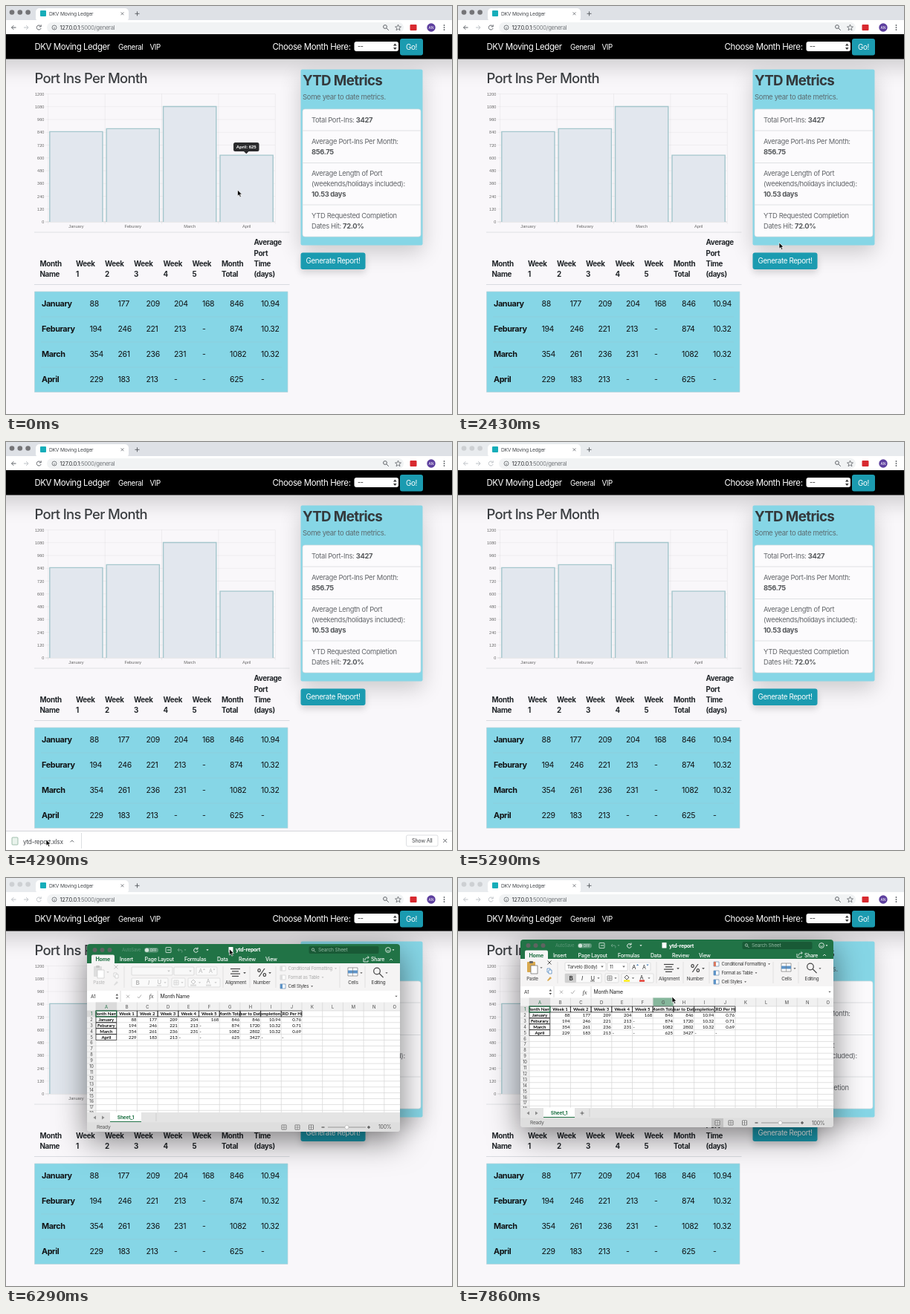
Animation, 600 px wide and 550 px high, one loop 8000 ms. Source, as an HTML page with a canvas:

```html
<!DOCTYPE html>
<html lang="en">
<head>
<meta charset="utf-8">
<title>Monthly report</title>
<style>
html, body { margin: 0; width: 100%; height: 100%; overflow: hidden; }
canvas { display: block; }
</style>
</head>
<body>
<canvas id="stage" width="600" height="550"></canvas>
<script>
const ctx = document.getElementById('stage').getContext('2d');
const LOOP = 8000, CYAN = '#86d6e6', TEAL = '#1b9bb0', GREEN = '#217346';
const BRAND = 'DKV Moving Ledger';
const SANS = 'Inter, sans-serif', ARIAL = '"Liberation Sans", sans-serif', LATO = 'Lato, sans-serif';
const TRACKING = -0.035; // em, the tight setting of the interface face
const months = ['January', 'Feburary', 'March', 'April'];
const weeks = [[88, 177, 209, 204, 168], [194, 246, 221, 213, '-'], [354, 261, 236, 231, '-'], [229, 183, 213, '-', '-']];
const totals = [846, 874, 1082, 625];
const portDays = ['10.94', '10.32', '10.32', '-'];
const hitRate = ['0.76', '0.71', '0.69', '-'];

// [time, x, y]; the pointer and the spreadsheet window
const pointerPath = [[0, 311.5, 248], [1000, 311.5, 248], [1710, 374, 280], [2000, 374, 280], [2430, 432, 319],
  [2680, 440, 342], [3000, 440, 342], [3570, 195, 473], [3900, 54, 536], [4700, 54, 536]];
const windowPath = [[6000, 124, 93], [6290, 109, 89], [6570, 84, 83]];
const afterDrag = [[7000, 275, 89.5], [7140, 275, 89.5], [7720, 288, 160]];

function along(path, t) {
  const i = path.findIndex(p => p[0] > t);
  if (i < 0) return path.at(-1).slice(1);
  if (i === 0) return path[0].slice(1);
  const [a, b] = [path[i - 1], path[i]];
  const k = (t - a[0]) / (b[0] - a[0]), e = k * k * (3 - 2 * k);
  return [1, 2].map(n => a[n] + (b[n] - a[n]) * e);
}

function text(s, x, y, size, color = '#212529', { weight = 400, align = 'left', font = SANS } = {}) {
  ctx.font = `${weight} ${size}px ${font}`;
  ctx.letterSpacing = (font === SANS ? TRACKING * size : 0) + 'px';
  ctx.textAlign = align;
  ctx.fillStyle = color;
  ctx.fillText(s, x, y);
}
function box(x, y, w, h, fill, radius = 0, stroke) {
  ctx.beginPath();
  ctx.roundRect(x, y, w, h, radius);
  if (fill) { ctx.fillStyle = fill; ctx.fill(); }
  if (stroke) { ctx.strokeStyle = stroke; ctx.lineWidth = 0.7; ctx.stroke(); }
}
function dot(x, y, r, fill, stroke, width = 1) {
  ctx.beginPath();
  ctx.arc(x, y, r, 0, 7);
  if (fill) { ctx.fillStyle = fill; ctx.fill(); }
  if (stroke) { ctx.strokeStyle = stroke; ctx.lineWidth = width; ctx.stroke(); }
}
function line(points, color, width = 1) {
  ctx.beginPath();
  for (let i = 0; i < points.length; i += 2) ctx.lineTo(points[i], points[i + 1]);
  ctx.strokeStyle = color;
  ctx.lineWidth = width;
  ctx.stroke();
}
function shape(d, fill, stroke, width = 1) {
  const p = new Path2D(d);
  if (fill) { ctx.fillStyle = fill; ctx.fill(p); }
  if (stroke) { ctx.strokeStyle = stroke; ctx.lineWidth = width; ctx.stroke(p); }
}
function at(x, y, draw) {
  ctx.save();
  ctx.translate(x, y);
  draw();
  ctx.restore();
}
function shadowed(color, blur, dy, draw) {
  ctx.save();
  Object.assign(ctx, { shadowColor: color, shadowBlur: blur, shadowOffsetY: dy });
  draw();
  ctx.restore();
}
const largeShadow = draw => shadowed('rgba(0,0,0,.19)', 29, 9.6, draw);
const cross = (x, y, r, color, w = 1) => {
  line([x - r, y - r, x + r, y + r], color, w);
  line([x - r, y + r, x + r, y - r], color, w);
};
const plus = (x, y, r, color, w = 1) => {
  line([x - r, y, x + r, y], color, w);
  line([x, y - r, x, y + r], color, w);
};
const caret = (x, y, color, s = 1) => shape(`M${x - 2 * s} ${y - s}h${4 * s}l${-2 * s} ${2.4 * s}z`, color);
const magnifier = (x, y, r, color, w = 1) => {
  dot(x, y, r, null, color, w);
  line([x + r * 0.7, y + r * 0.7, x + r * 2, y + r * 2], color, w);
};

function browserBar(active) {
  box(0, 0, 600, 19, active ? '#dee1e6' : '#e8ebee');
  for (const x of [8, 18.8, 29.6]) dot(x, 8.5, 3.3, active ? '#747477' : '#cdd0d3');
  box(40, 3, 125, 18, '#fff', 5);
  box(46, 6, 8, 8, '#16adb9', 1);
  text(BRAND, 58, 12.6, 6.7, '#45494d');
  cross(156.5, 10.3, 1.9, '#5f6368', 0.8);
  plus(176.5, 10.3, 3, '#5f6368', 1);
  box(0, 19, 600, 19, '#fff');
  const nav = active ? '#5f6368' : '#bdc1c6';
  line([13.5, 29, 7.5, 29], nav);
  line([10.3, 26.2, 7.5, 29, 10.3, 31.8], nav);
  line([24, 29, 30, 29], '#bdc1c6');
  line([27.2, 26.2, 30, 29, 27.2, 31.8], '#bdc1c6');
  shape('M46.5 27a3 3 0 1 0 .6 3M47.2 25.3v2.6h-2.6', null, nav);
  box(55, 22, 480, 14, '#f1f3f4', 7);
  dot(65, 29, 3, null, '#5f6368', 0.8);
  line([65, 28.5, 65, 31], '#5f6368', 0.8);
  text('127.0.0.1', 72.5, 31.7, 7.6, '#303236');
  text(':5000/general', 72.5 + ctx.measureText('127.0.0.1').width, 31.7, 7.6, '#74787c');
  magnifier(510, 28, 2.4, '#5f6368');
  shape('M527.5 25l1.1 2.8 2.9.2-2.3 1.8.8 2.9-2.5-1.6-2.5 1.6.8-2.9-2.3-1.8 2.9-.2z', null, '#5f6368', 0.8);
  box(543.5, 25, 9, 8, '#d8292f', 1);
  dot(572, 29, 5.7, '#5d3f9e');
  text('AN', 572, 31, 5, '#fff', { align: 'center' });
  for (const y of [26, 29, 32]) dot(589.5, y, 0.9, '#5f6368');
}

function button(label, x, y, w, h, baseline, size, fill = TEAL) {
  shadowed('rgba(0,0,0,.15)', 9.6, 4.8, () => box(x, y, w, h, fill, 3));
  text(label, x + w / 2, baseline, size, '#fff', { align: 'center' });
}

function navBar() {
  largeShadow(() => box(-30, 38, 660, 33.5, '#000'));
  text(BRAND, 38.5, 59.3, 11.4, '#fff');
  text('General', 151, 58.8, 9.7, '#fff');
  text('VIP', 193.5, 58.8, 9.7, '#fff');
  text('Choose Month Here:', 358.5, 59.3, 11.5, '#fff');
  box(468.5, 48, 59.5, 13, '#fff', 3);
  text('--', 473, 57.3, 9, '#222');
  shape('M521 53.5l2.3-3 2.3 3zM521 56l2.3 3 2.3-3z', '#333');
  box(530, 44, 31, 22.5, TEAL, 3);
  text('Go!', 545.5, 58.7, 9.8, '#fff', { align: 'center' });
}

function chart(showTip) {
  text('Port Ins Per Month', 38.5, 103.5, 18.4, '#3a3d40', { weight: 500 });
  const yOf = v => 291 - v * 172.5 / 1200;
  for (let v = 0; v <= 1200; v += 120) {
    text(v, 51.3, yOf(v) + 2, 5.5, '#666', { align: 'right', font: ARIAL });
    line([53, yOf(v), 362, yOf(v)], v ? 'rgba(0,0,0,.06)' : 'rgba(0,0,0,.18)', 0.7);
  }
  for (let i = 0; i < 5; i++) line([56.7 + i * 76.4, 118.5, 56.7 + i * 76.4, 294], 'rgba(0,0,0,.07)', 0.7);
  months.forEach((name, i) => {
    const x = 58.8 + i * 76.4, y = yOf(totals[i]);
    ctx.fillStyle = '#e2e7ee';
    ctx.fillRect(x, y, 71.2, 291 - y);
    line([x, 291, x, y, x + 71.2, y, x + 71.2, 291], '#a4c6cc', 1.4);
    text(name, x + 35.6, 299, 5.7, '#666', { align: 'center', font: ARIAL });
  });
  if (showTip) {
    box(306, 184, 34.5, 12, '#2b2b2d', 2.5);
    shape('M320 196h6.5l-3.25 3.2z', '#2b2b2d');
    text('April: 625', 323.2, 192.2, 5.9, '#fff', { align: 'center', font: ARIAL, weight: 700 });
  }
}

function monthTable() {
  line([38, 305, 381.5, 305], '#dee0e4');
  line([38, 375.5, 381.5, 375.5], '#d8dbe0');
  const heads = ['Month Name', 'Week 1', 'Week 2', 'Week 3', 'Week 4', 'Week 5', 'Month Total', 'Average Port Time (days)'];
  const headX = [45.5, 94, 133, 172, 211.5, 250.5, 290, 333.5];
  heads.forEach((head, i) => {
    const words = head.split(' ');
    words.forEach((word, n) => text(word, headX[i], 365 - 14.2 * (words.length - 1 - n), 9.8, '#212529', { weight: 700 }));
  });
  box(38.5, 385, 340.5, 135.5, CYAN, 0, '#b9d3da');
  const cellX = [112.5, 150.5, 188.5, 226, 264, 301, 343];
  months.forEach((name, r) => {
    const y = 405.3 + r * 34;
    if (r) line([47, y - 20.3, 371, y - 20.3], 'rgba(150,195,205,.55)', 0.8);
    text(name, 48, y, 10.8, '#101214', { weight: 700 });
    [...weeks[r], totals[r], portDays[r]].forEach((v, i) => text(v, cellX[i], y, 10.5, '#101214'));
  });
}

function metricsCard(hover) {
  largeShadow(() => box(396.5, 85.5, 164, 237, CYAN, 2));
  text('YTD Metrics', 399, 107, 18.8, '#34393c', { weight: 700 });
  text('Some year to date metrics.', 399, 126, 9.5, '#5c6b70');
  box(399, 139, 159, 172, '#fcfbfd', 3, '#d5d9dd');
  for (const y of [168, 211.5, 268]) line([399, y, 558, y], '#dfe1e4');
  const rows = [['Total Port-Ins: ', 157.3, '3427'], ['Average Port-Ins Per Month:', 186.3], ['', 200.3, '856.75'],
    ['Average Length of Port', 229], ['(weekends/holidays included):', 243], ['', 257.2, '10.53 days'],
    ['YTD Requested Completion', 285.5], ['Dates Hit: ', 299.5, '72.0%']];
  for (const [label, y, value] of rows) {
    text(label, 411, y, 9.4, '#63666a');
    if (value) text(value, 411 + ctx.measureText(label).width, y, 9.4, '#55585b', { weight: 700 });
  }
  button('Generate Report!', 396.5, 332.5, 87, 22.5, 347.3, 9.75, hover ? '#138496' : TEAL);
}

function downloadShelf(t) {
  const open = t > 3140 && t < 4570;
  if (open) {
    box(0, 525, 600, 25, '#fff');
    line([0, 524.5, 600, 524.5], '#d5d7da');
    box(8, 533, 8, 10, '#e9f3ec', 1, '#7fa890');
    text('ytd-report.xlsx', 23, 541.5, 8.3, '#44474b');
    line([86.5, 539.3, 88.8, 537, 91.1, 539.3], '#5f6368');
    line([101.5, 527, 101.5, 548], '#dcdee1');
    box(538.5, 530, 42.5, 15, '#fff', 2, '#cfd2d6');
    text('Show All', 559.7, 540.2, 7.2, '#44474b', { align: 'center' });
    cross(590.7, 537.5, 2.4, '#5f6368');
  }
  if (t > 2640 && t < 3750) {
    const y = open ? 514 : 539;
    box(-1, y, 199, 11, '#fff', [0, 2, 0, 0], '#b9bcc0');
    text('127.0.0.1:5000/ytd-report', 0.5, y + 8, 7.3, '#85898d');
  }
  const k = (t - 3200) / 700;
  if (k > 0 && k < 1) {
    ctx.globalAlpha = Math.sin(k * Math.PI);
    dot(18, 525, 17, 'rgba(225,228,232,.55)', 'rgba(190,195,200,.7)');
    shape('M16.2 518h3.6v5h3.2l-5 5.5-5-5.5h3.2z', '#4a90d9');
    ctx.globalAlpha = 1;
  }
}

function ribbon(on) {
  const ink = on ? '#333' : '#b5b5b5', soft = on ? '#666' : '#c6c6c6';
  const label = (s, x) => text(s, x, 54.5, 6.3, '#333', { align: 'center' });
  box(0, 26, 421, 37, '#f5f4f4');
  for (const x of [50, 183, 219, 254, 340, 374]) line([x, 30, x, 59], '#dcdcdc', 0.8);
  // Clipboard
  box(9, 30, 11, 14, on ? '#d9a94f' : '#ddd', 1);
  box(12, 29, 5, 3, soft, 1);
  box(14, 35, 9, 11, '#fff', 0, soft);
  text('Paste', 16, 54.5, 6.3, ink, { align: 'center' });
  caret(28, 38, soft, 0.8);
  cross(39, 31, 2.5, ink, 0.8);
  box(36, 39, 4, 5, '#fff', 0, on ? '#3d7ab8' : soft);
  box(38, 41, 4, 5, '#fff', 0, on ? '#3d7ab8' : soft);
  shape('M36 55l4-5 2 2-5 4z', on ? '#d9a94f' : '#ddd');
  // Font
  box(60, 31, 55, 11, on ? '#fff' : '#f8f8f8', 1, '#cfcfcf');
  box(117, 31, 27, 11, on ? '#fff' : '#f8f8f8', 1, '#cfcfcf');
  if (on) {
    text('Tarvelo (Body)', 63, 39, 6.3, '#333');
    text('11', 120, 39, 6.3, '#333');
  }
  caret(110, 36.5, soft, 0.9);
  caret(139, 36.5, soft, 0.9);
  box(147, 31, 28, 11, '#fafafa', 1, '#d5d5d5');
  text('A', 150, 39.5, 8, ink);
  text('A', 164, 39.5, 7, ink);
  shape('M156 35l1.5-2 1.5 2zM169.5 33.5h3l-1.5 2z', on ? '#3d7ab8' : soft);
  box(60, 46, 49, 12, '#fafafa', 1, '#d5d5d5');
  if (on) box(60, 46, 15, 12, '#cfcfcf', 1);
  text('B', 65.5, 55, 8, ink, { weight: 700 });
  text('I', 82, 55, 8, ink, { weight: 'italic 400' });
  text('U', 94.5, 54.5, 7.5, ink);
  line([94, 56, 100, 56], ink, 0.7);
  caret(105, 52, soft, 0.8);
  box(114, 46, 18, 12, '#fafafa', 1, '#d5d5d5');
  box(117, 49, 6, 6, null, 0, soft);
  plus(120, 52, 3, soft, 0.6);
  caret(128, 52, soft, 0.8);
  box(136, 46, 43, 12, '#fafafa', 1, '#d5d5d5');
  shape('M140 51l3-3 3 3-3 3z', null, ink, 0.8);
  box(139, 54.5, 8, 2.2, on ? '#ffeb00' : '#ddd');
  caret(151.5, 52, soft, 0.8);
  text('A', 160.5, 53.5, 7.5, ink);
  box(160, 54.5, 7, 2.2, on ? '#e02b20' : '#ddd');
  caret(173, 52, soft, 0.8);
  // Alignment, number, styles, cells, editing
  [0, 1, 2, 3].forEach(i => line([193 + i % 2 * 2, 33.5 + i * 3.3, 206 - i % 2 * 2, 33.5 + i * 3.3], '#444', 1.2));
  caret(212, 39, '#555', 0.9);
  label('Alignment', 200);
  text('%', 235, 44, 15, '#444', { align: 'center', weight: 500 });
  caret(246, 39, '#555', 0.9);
  label('Number', 235);
  ['Conditional Formatting', 'Format as Table', 'Cell Styles'].forEach((s, i) => {
    const y = 33 + i * 12, live = on || i === 2;
    box(260, y - 3, 7, 6, '#fff', 0, live ? '#6488ac' : '#ccc');
    box(260, y - 3, 3, 6, live ? ['#d9785f', '#5d93c7', '#5d93c7'][i] : '#ddd');
    text(s, 270.5, y + 2.2, 6, live ? '#333' : '#aaa');
    caret(275 + ctx.measureText(s).width, y, live ? '#555' : '#bbb', 0.7);
  });
  box(351, 32, 13, 11, '#fff', 0, '#777');
  box(351, 35.5, 13, 4, '#5d93c7');
  line([357.5, 32, 357.5, 43], '#777', 0.6);
  caret(369, 39, '#555', 0.8);
  label('Cells', 358);
  magnifier(390, 36.5, 4.3, '#444', 1.2);
  caret(403, 39, '#555', 0.8);
  label('Editing', 392);
}

function sheet(hoverG) {
  const colX = i => 12 + i * 27.7, rowY = i => 90 + i * 7.9;
  box(0, 63, 421, 177, '#fff');
  text('A1', 5, 73, 6.6, '#333');
  shape('M38.5 69.5l1.8-2.5 1.8 2.5zM38.5 72l1.8 2.5 1.8-2.5z', '#555');
  line([45, 63, 45, 78], '#d0d0d0', 0.8);
  cross(55, 70.7, 2, '#b0b0b0');
  line([68, 71, 69.7, 73, 73, 68.5], '#b0b0b0');
  text('fx', 83.5, 73.5, 8.5, '#444', { weight: 'italic 400', font: '"Liberation Serif", serif' });
  line([95, 63, 95, 78], '#d0d0d0', 0.8);
  text('Month Name', 98.5, 73.2, 6.9, '#222');
  caret(416, 70.5, '#555', 0.8);
  box(0, 78.5, 421, 11.5, '#f1f1f1');
  box(0, 90, 12, 137, '#f1f1f1');
  box(colX(0), 78.5, 27.7, 11.5, '#dadada');
  box(0, 90, 12, 7.9, '#dadada');
  if (hoverG) box(colX(6), 78.5, 27.7, 11.5, '#86b79c');
  ctx.save();
  ctx.beginPath();
  ctx.rect(0, 78.5, 421, 148.5);
  ctx.clip();
  for (let i = 0; i < 15; i++) {
    line([colX(i), 78.5, colX(i), 227], '#d4d4d4', 0.7);
    text(String.fromCharCode(65 + i), colX(i) + 13.9, 86.7, 5.8, i ? '#444' : GREEN, { align: 'center' });
  }
  for (let i = 0; i < 18; i++) {
    line([0, rowY(i), 421, rowY(i)], '#d4d4d4', 0.7);
    text(i + 1, 6, rowY(i) + 6, 5.7, i ? '#444' : GREEN, { align: 'center' });
  }
  const cell = (s, c, r, bold) => {
    ctx.save();
    ctx.beginPath();
    ctx.rect(colX(c), rowY(r), 27.7, 7.9);
    ctx.clip();
    const align = bold ? 'center' : s === '-' ? 'left' : 'right';
    const x = colX(c) + { center: 13.85, left: 1, right: 26.7 }[align];
    text(s, x, rowY(r) + 6, 6, '#000', { align, weight: bold ? 700 : 400, font: LATO });
    ctx.restore();
    if (bold) box(colX(c), rowY(r), 27.7, 7.9, null, 0, '#222');
  };
  ['Month Name', 'Week 1', 'Week 2', 'Week 3', 'Week 4', 'Week 5', 'Month Total', 'Year to Date', 'Completion D', 'CRD Per Hit']
    .forEach((s, i) => cell(s, i, 0, true));
  let yearToDate = 0;
  months.forEach((name, r) => {
    yearToDate += totals[r];
    cell(name, 0, r + 1, true);
    [...weeks[r], totals[r], yearToDate, portDays[r], hitRate[r]].forEach((v, i) => cell(v, i + 1, r + 1));
  });
  ctx.strokeStyle = GREEN;
  ctx.lineWidth = 1.2;
  ctx.strokeRect(colX(0), rowY(0), 27.7, 7.9);
  ctx.restore();
}

function spreadsheet(t) {
  const on = t >= 7070;
  shadowed('rgba(0,0,0,.5)', 42, 12, () => box(0, 0, 421, 253, '#e6e6e6', 4));
  box(0, 0, 421, 27, GREEN, [4, 4, 0, 0]);
  for (const x of [10.5, 20.5, 30.5]) dot(x, 8, 3, '#5f6461');
  text('AutoSave', 47, 10.2, 6, '#5b9577');
  box(77, 5, 19, 6.5, '#5b9577', 3.2);
  dot(80.5, 8.2, 2.6, '#d5e5dc');
  text('OFF', 84.5, 10.2, 5, '#e4efe8');
  box(106, 4.5, 7, 7, null, 0.5, '#fff');
  line([108, 8, 112, 8], '#fff', 0.8);
  shape('M122 8h5a2 2 0 0 1 0 3.5M124 6l-2 2 2 2', null, '#6fa488', 0.9);
  caret(132, 8, '#6fa488', 0.7);
  shape('M148.5 6.5a2.8 2.8 0 1 0 .7 2.5M149 4.5v2.5h-2.5', null, '#fff', 0.9);
  caret(162, 8, '#fff', 0.8);
  box(190.5, 4, 6, 7.5, '#fff', 0.5);
  text('ytd-report', 200, 10.5, 7, '#fff', { weight: 700 });
  box(298.5, 3, 94, 10, '#195a36', 2);
  magnifier(304, 7.5, 1.7, '#b5d0c0', 0.8);
  text('Search Sheet', 311, 10.4, 6.7, '#8fb7a0');
  dot(405, 8, 3.4, null, '#fff', 0.8);
  shape('M403.2 8.5q1.8 2 3.6 0', null, '#fff', 0.7);
  caret(412, 8, '#fff', 0.7);
  box(6, 14.5, 31, 13, '#f5f4f4', [2, 2, 0, 0]);
  [['Home', 11.5], ['Insert', 44], ['Page Layout', 77.5], ['Formulas', 131], ['Data', 175], ['Review', 204], ['View', 240]]
    .forEach(([s, x], i) => text(s, x, 23.5, 7.1, i ? '#fff' : GREEN, { weight: i ? 500 : 700 }));
  shape('M372 19v5h6v-2M374 22q0-4 5-4m-1.5-1.7l1.8 1.7-1.8 1.7', null, '#fff', 0.8);
  text('Share', 382, 23.5, 7, '#fff', { weight: 500 });
  line([407, 22, 409, 20, 411, 22], '#fff', 0.8);
  ribbon(on);
  sheet(t >= 7640);
  // Sheet tabs and status bar
  box(0, 227, 421, 13.5, '#e4e4e4');
  shape('M12 231.5v5l-3.5-2.5zM20 231.5v5l3.5-2.5z', '#8b8b8b');
  box(31, 226.5, 42, 13.5, '#fff');
  line([31, 239.5, 73, 239.5], GREEN);
  text('Sheet_1', 52, 235.7, 6.6, GREEN, { align: 'center', weight: 700 });
  line([93, 228, 93, 239], '#c6c6c6', 0.7);
  if (on) plus(83, 234, 2.5, '#555', 0.9);
  box(0, 240.5, 421, 12.5, '#dedede', [0, 0, 4, 4]);
  text('Ready', 13, 249.4, 6.6, '#555');
  if (on) box(257, 241, 16, 12, '#c2c2c2');
  for (const x of [265, 283, 301.5]) {
    box(x - 3, 244, 6, 6, '#f4f4f4', 0, '#555');
    plus(x, 247, 3, '#555', 0.6);
  }
  line([315.5, 247, 319.5, 247], '#444', 1.1);
  line([324, 247, 375, 247], '#9a9a9a', 1.2);
  dot(349.5, 247, 2.6, '#fff', '#aaa', 0.6);
  plus(379, 247, 2, '#444', 1.1);
  text('100%', 392, 249.5, 6.9, '#555');
}

function pointer(x, y, kind) {
  at(x, y, () => {
    if (kind === 'beam') return shape('M-1.5-4.5q1.5 0 1.5 1.5v7q0 1.5-1.5 1.5M1.5-4.5q-1.5 0-1.5 1.5v7q0 1.5 1.5 1.5M-1 1.5h2', null, '#222', 0.9);
    if (kind === 'hand') return shape('M-1 0q1-1.5 2 0v3.5l4 .8q1 .4.8 2l-.8 3.7h-5l-3-4q0-1.5 2 0z', '#fff', '#111', 0.8);
    shape('M0 0v8.2l1.9-1.7 1.4 3 1.5-.7-1.4-2.9h2.6z', '#000', '#fff', 0.7);
  });
}

function draw(now) {
  const t = now % LOOP;
  const [px, py] = along(pointerPath, t);
  const onButton = t > 2600 && px > 396 && px < 484 && py > 332 && py < 355;
  box(0, 0, 600, 550, '#f9f7fa');
  navBar();
  browserBar(t < 4430);
  chart(px < 359 && t < 1800);
  monthTable();
  metricsCard(onButton);
  downloadShelf(t);
  if (t < 4700) pointer(px, py, onButton ? 'hand' : t > 3100 && py > 385 && py < 515 ? 'beam' : 'arrow');
  if (t >= 6000) {
    const [wx, wy] = along(windowPath, t);
    at(wx, wy, () => spreadsheet(t));
    if (t < 7000) pointer(wx + 191.5, wy + 6.7);
    else pointer(...along(afterDrag, t));
  }
  requestAnimationFrame(() => draw(performance.now()));
}
draw(performance.now());
</script>
</body>
</html>
```
